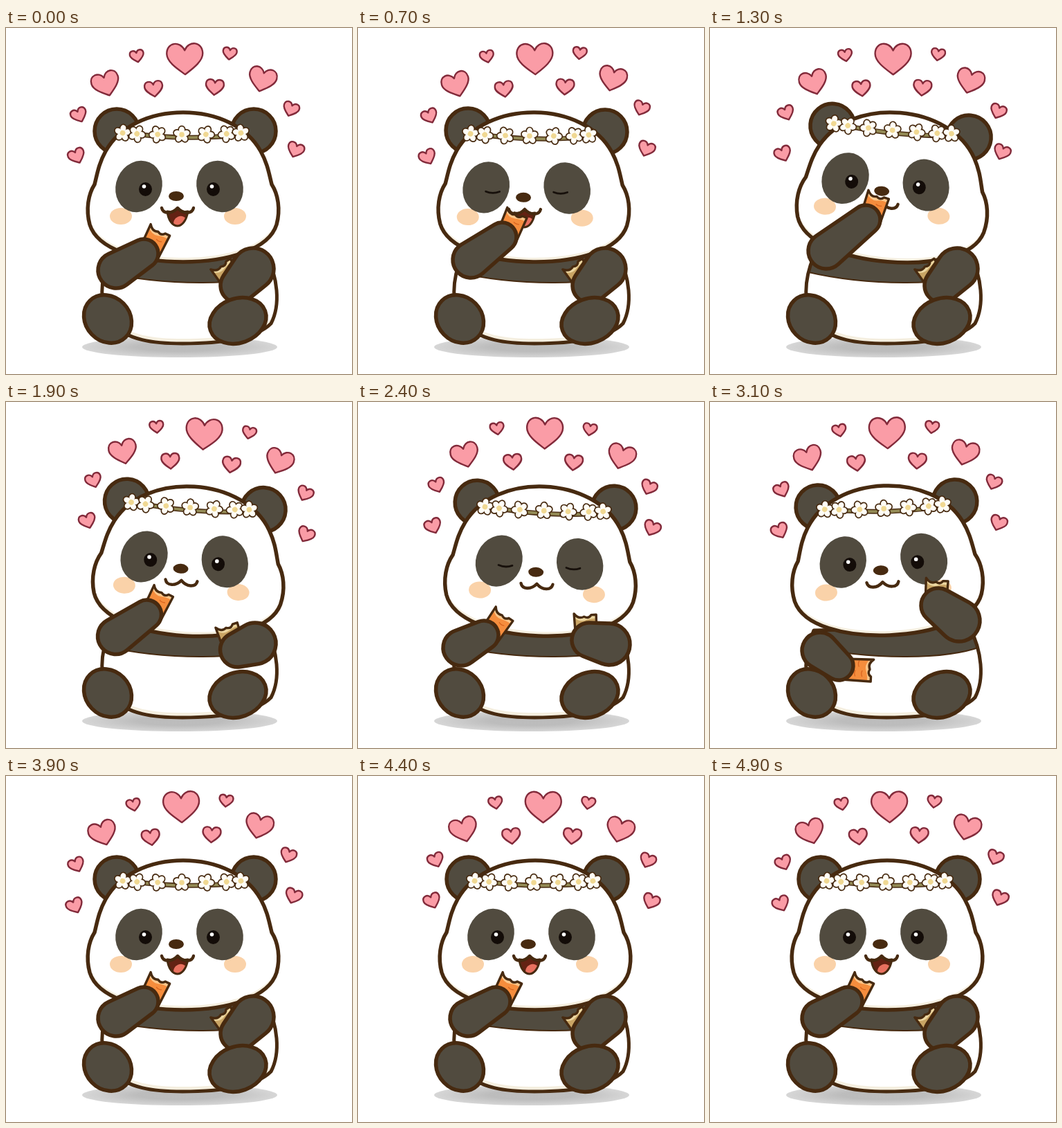
Write an HTML page with a canvas that moves like this. It is 500 by 500 pixels and loops after 5 s.

```html
<!DOCTYPE html>
<html lang="en">
<head>
<meta charset="utf-8">
<title>Snacking panda</title>
<style>
html, body { margin: 0; width: 100%; height: 100%; overflow: hidden; background: #fff; }
canvas { display: block; width: 100vw; height: 100vh; }
</style>
</head>
<body>
<canvas id="stage" width="500" height="500"></canvas>
<script>
const c = document.getElementById('stage').getContext('2d');
const LOOP = 5000, STEP = 100, TAU = Math.PI * 2;
const LINE = '#472a10', FUR = '#514b3f', CREAM = '#f5efe0', SIDES = [-1, 1];

// head: dx, dy, tilt; face: shift on the head; arms: elbow, paw, snack angle
const rest = {
  head: [0, 0, 0], face: [0, 0], mouth: 1,
  left: [159, 350, 199, 326, 0.45], right: [357, 348, 335, 372, -0.6]
};
const nibble = { ...rest, head: [-2, 0, 0.01], face: [-5, 2], left: [163, 335, 208, 302, 0.4] };
const bite = { ...rest, head: [8, 0, 0.085], face: [-7, -6], mouth: 0, left: [168, 322, 225, 277, 0.32] };
const chew = {
  head: [8, 0, 0.04], face: [3, 3], mouth: 0,
  left: [149, 355, 182, 337, 0.6], right: [363, 350, 334, 344, -0.05]
};
const swap = {
  head: [0, -1, -0.04], face: [1, 1], mouth: 0,
  left: [159, 359, 186, 381, 1.62], right: [360, 316, 330, 294, 0.06]
};
const poses = [[0, rest], [300, rest], [700, nibble], [900, nibble], [1300, bite], [1600, bite],
  [2200, chew], [2500, chew], [3000, swap], [3300, swap], [3800, rest], [LOOP, rest]];

const headShape = new Path2D();
for (const s of SIDES) {
  const half = new Path2D('M0 122C48 122 92 142 112 178C122 196 124 210 128 226' +
    'C137 240 141 262 135 284C124 320 64 338 0 338');
  headShape.addPath(half, new DOMMatrix([s, 0, 0, 1, 256, 0]));
}
const bodyShape = new Path2D('M150 330C135 365 135 400 150 425C175 452 215 456 255 456' +
  'C310 456 360 450 383 427C397 400 393 360 375 325Z');
const bandShape = new Path2D('M130 300H400V350C350 373 230 375 130 350Z');
const heartShape = new Path2D('M0 .43C-.2 .28-.5 .08-.5-.15C-.5-.48-.12-.52 0-.24' +
  'C.12-.52 .5-.48 .5-.15C.5 .08 .2 .28 0 .43Z');
const lipShape = new Path2D('M-23-1C-21 8-8 8 0-1C8 8 21 8 23-1');

function mix(a, b, k) {
  if (Array.isArray(a)) return a.map((v, i) => mix(v, b[i], k));
  if (typeof a === 'object') {
    return Object.fromEntries(Object.keys(a).map(n => [n, mix(a[n], b[n], k)]));
  }
  return a + (b - a) * k;
}

function poseAt(t) {
  const i = poses.findIndex(p => p[0] > t);
  const [t0, a] = poses[i - 1], [t1, b] = poses[i];
  const k = (t - t0) / (t1 - t0);
  return mix(a, b, k * k * (3 - 2 * k));
}

const bump = (t, mid, width) => Math.exp(-(((t - mid) / width) ** 2));
const sway = t => 0.1 * bump(t, 1850, 560) + 0.04 * bump(t, 4450, 280) -
  0.009 * (1 - Math.cos(TAU * t / 2500));

function group(x, y, angle, draw) {
  c.save();
  c.translate(x, y);
  c.rotate(angle);
  draw();
  c.restore();
}

function paint(path, fill, line, width) {
  if (fill) { c.fillStyle = fill; c.fill(path); }
  if (line) { c.strokeStyle = line; c.lineWidth = width; c.stroke(path); }
}

function oval(x, y, rx, ry, angle, fill, line, width) {
  const p = new Path2D();
  p.ellipse(x, y, rx, ry, angle, 0, TAU);
  paint(p, fill, line, width);
}

function shadow() {
  group(251, 461, 0, () => {
    c.scale(1, 0.107);
    const g = c.createRadialGradient(0, 0, 60, 0, 0, 141);
    g.addColorStop(0, 'rgba(70,70,70,.36)');
    g.addColorStop(1, 'rgba(70,70,70,.22)');
    oval(0, 0, 141, 141, 0, g);
  });
}

function heart(x, y, w) {
  group(x, y, x * 0.0025, () => {
    c.scale(w, w);
    paint(heartShape, '#fa9ca6', '#822a3a', 2.4 / w);
  });
}

// an arch of mirrored pairs, leaning a little to the left
function hearts(t) {
  group(255, 350, sway(t) - 0.028, () => {
    c.translate(10, -350);
    heart(2, 45, 52);
    for (const s of SIDES) {
      heart(s * 67, 39, 20);
      heart(s * 44, 87, 26);
      heart(s * 113, 78, 40);
      heart(s * 153, 122, 23);
      heart(s * 158, 181, 24);
    }
  });
}

// white shape with a cream rim along the bottom
function plump(path, lift) {
  c.save();
  c.clip(path);
  paint(path, CREAM);
  c.translate(0, -lift);
  paint(path, '#fff');
  c.restore();
}

function body() {
  plump(bodyShape, 7);
  c.save();
  c.clip(bodyShape);
  paint(bandShape, FUR, LINE, 2);
  c.restore();
  paint(bodyShape, null, LINE, 5);
}

function flower(x, y, turn) {
  group(x, y, turn, () => {
    for (const outline of [LINE, null]) {
      for (let k = 0; k < 5; k++) {
        const a = k * TAU / 5 - TAU / 4;
        oval(Math.cos(a) * 6.8, Math.sin(a) * 6.8, 4.8, 4, a, '#fffdf6', outline, 3.4);
      }
    }
    oval(0, 0, 3.8, 3.8, 0, '#f0d892');
  });
}

function wreath() {
  const vine = new Path2D('M164 150Q250 164 346 154');
  paint(vine, null, LINE, 7);
  paint(vine, null, '#938a55', 4);
  for (let k = -3; k <= 3; k++) {
    const a = k * 0.38;
    flower(254 + 94 * Math.sin(a), 150 + 4 * Math.cos(a), a);
  }
}

function eye(side, asleep) {
  const x = 250.5 + side * 58.5, px = x - side * 9.5;
  oval(x, 229, 33, 38, side * -0.42, FUR);
  if (asleep) {
    paint(new Path2D(`M${px - 10} 235q10 4 20 0`), null, '#17100b', 2.8);
  } else {
    oval(px, 233, 9.5, 10, 0, '#130c08');
    oval(px - 2, 229, 2.8, 2.8, 0, '#fff');
  }
}

function mouth(open) {
  group(248, 261, 0, () => {
    if (open > 0.05) {
      const low = 5 + 26 * open;
      const jaw = new Path2D(`M-15 4C-12 ${low} 10 ${low + 2} 15 4Q6 6 0 0Q-6 6-15 4Z`);
      c.save();
      c.clip(jaw);
      paint(jaw, '#632213');
      oval(4, 5 + 15 * open, 10, 9 * open, -0.4, '#e8715f');
      c.restore();
      paint(jaw, null, LINE, 3);
    }
    paint(lipShape, null, LINE, 4.4);
  });
}

function head(pose, asleep) {
  const [dx, dy, tilt] = pose.head;
  group(255 + dx, 250 + dy, tilt, () => {
    c.translate(-255, -250);
    for (const s of SIDES) oval(259 + s * 99, 149, 32, 32, 0, FUR, LINE, 5.5);
    plump(headShape, 6);
    paint(headShape, null, LINE, 5.5);
    c.translate(...pose.face);
    for (const s of SIDES) {
      oval(248.5 + s * 82.5, 272, 16, 12, 0, '#fad2a9');
      eye(s, asleep);
    }
    oval(246, 243, 11, 7, 0, LINE);
    mouth(pose.mouth);
    wreath();
  });
}

// held by its lower end, bitten at the top
function snack(x, y, angle, w, len, fill, pale, grain) {
  group(x, y, angle, () => {
    c.translate(0, -len);
    const h = w / 2;
    const p = new Path2D(`M${-h}-2Q${-h * 0.6} 7 ${-h * 0.1} 3Q${h * 0.3} 7 ${h * 0.55} 1` +
      `L${h} 1L${h - 1} ${len}H${1 - h}Z`);
    c.save();
    c.clip(p);
    paint(p, fill);
    paint(new Path2D(`M${-h} 0Q${-h * 0.5} 9 0 6T${h} 4`), null, pale, 5);
    for (let i = 0; i < 4; i++) {
      paint(new Path2D(`M${i % 2 ? 3 - h : 1} ${14 + i * 5}q4 2 8 0`), null, grain, 1.3);
    }
    c.restore();
    paint(p, null, LINE, 3.4);
  });
}

// outline around two circles: elbow and paw
function limb([x, y, px, py], r, pr) {
  const dir = Math.atan2(py - y, px - x);
  const open = Math.acos((r - pr) / Math.hypot(px - x, py - y));
  const p = new Path2D();
  p.arc(x, y, r, dir + open, dir - open + TAU);
  p.arc(px, py, pr, dir - open, dir + open);
  p.closePath();
  paint(p, FUR, LINE, 5.5);
}

function arms({ left, right }) {
  const [, , lx, ly, la] = left, [, , rx, ry, ra] = right;
  snack(lx + 5, ly + 5, la, 32, 43, '#f58d3d', '#fbc68a', '#d9641f');
  limb(left, 26, 21);
  snack(rx - 4, ry, ra, 32, 37, '#c9a464', '#ecd6a0', '#b58d4c');
  limb(right, 30, 25);
}

function feet() {
  oval(147, 420.5, 37, 32, 0.8, FUR, LINE, 5.5);
  oval(335, 423, 42, 32, -0.35, FUR, LINE, 5.5);
}

function render(t) {
  const pose = poseAt(t);
  const asleep = (t >= 600 && t < 900) || (t >= 2200 && t < 2600);
  c.fillStyle = '#fff';
  c.fillRect(0, 0, 500, 500);
  c.lineCap = c.lineJoin = 'round';
  shadow();
  hearts(t);
  body();
  head(pose, asleep);
  arms(pose);
  feet();
}

function tick(now) {
  render(Math.floor(now % LOOP / STEP) * STEP);
  requestAnimationFrame(tick);
}
requestAnimationFrame(tick);
</script>
</body>
</html>
```
